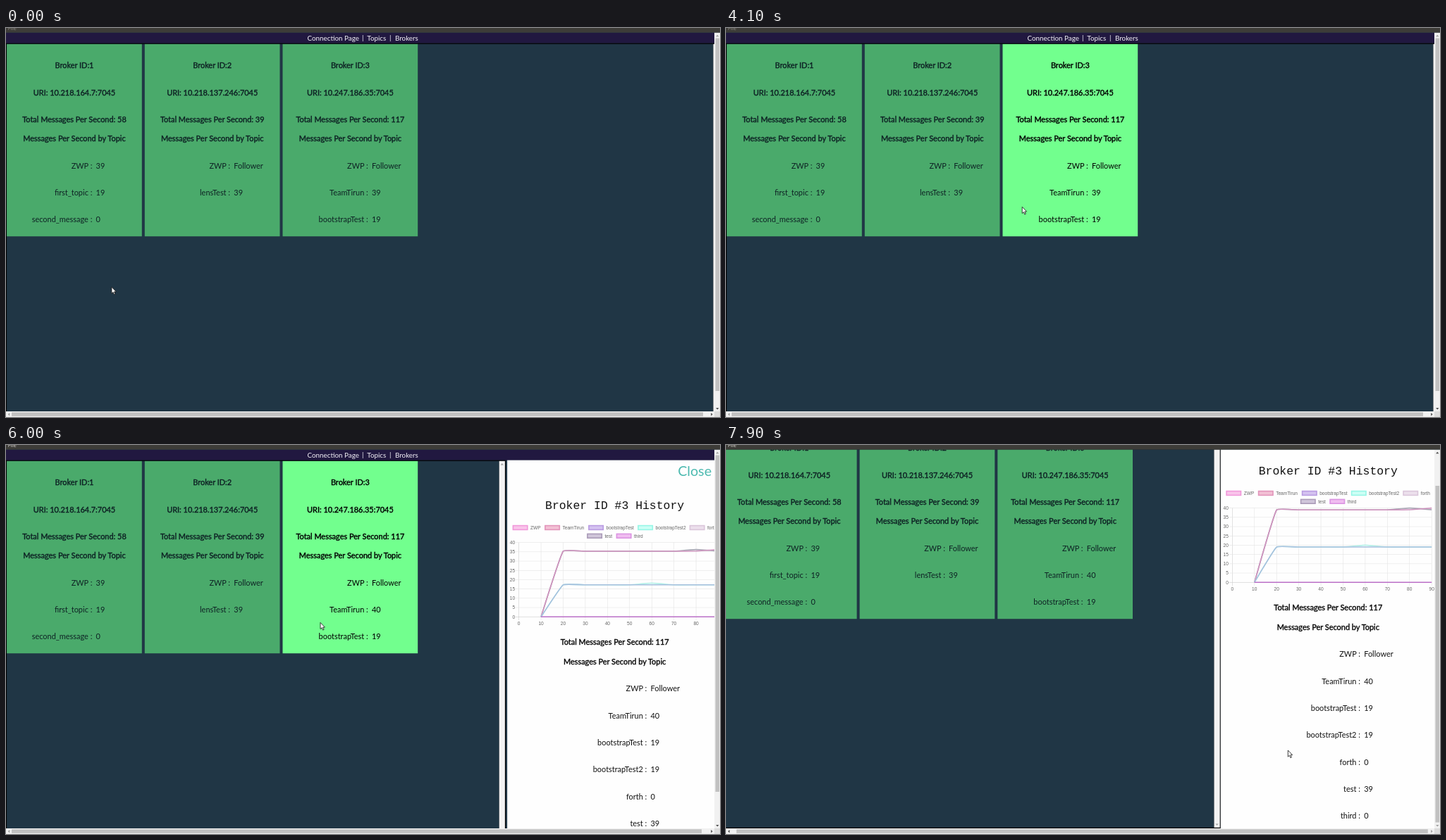
An HTML page that plays this animation: 1013 by 553 pixels, repeating every 8000 ms.

```html
<!DOCTYPE html>
<html lang="en">
<head>
<meta charset="utf-8">
<title>Broker dashboard</title>
<style>
html, body { margin: 0; width: 100%; height: 100%; overflow: hidden; background: #203645; }
svg { display: block; width: 100vw; height: 100vh; }
text { font-family: Lato, sans-serif; font-size: 10.95px; }
.bold { stroke-width: .4px; }
.nav { font-size: 9.86px; fill: #f4f2f8; }
.close { font-size: 19.7px; fill: #4dbab0; }
.title { font-family: "Liberation Mono", monospace; font-size: 16.43px; fill: #111; }
.tick { font-family: "Liberation Sans", sans-serif; font-size: 6.57px; fill: #666; }
.file { font-family: "Open Sans", sans-serif; font-size: 7.6px; }
.card rect { fill: #4aaa6b; }
.card text { fill: #0e2224; }
.card .bold { stroke: #0e2224; }
.card.on rect { fill: #72ff8e; }
.card.on text { fill: #000; }
.card.on .bold { stroke: #000; }
.panel .bold { stroke: #111; }
.panel .stat { fill: #111; }
</style>
</head>
<body>
<svg id="stage" viewBox="0 0 1013 553" preserveAspectRatio="none"></svg>
<script>
const LOOP = 8000, STEP = 100;
const OPEN = 5500, SLIDE = 5555, PANEL_W = 305, PAGE_W = 1012.8;
const SCROLL_X = 7.2, SCROLL_Y = 49;
const VIEW_R = 1005, VIEW_B = 545;
const ROW = 38.33;

const rect = (x, y, w, h, fill, extra = '') =>
  `<rect x="${x}" y="${y}" width="${w}" height="${h}" fill="${fill}" ${extra}/>`;
const text = (x, y, str, cls = '', anchor = 'middle', extra = '') =>
  `<text x="${x}" y="${y}" class="${cls}" text-anchor="${anchor}" ${extra}>${str}</text>`;
const row = (x, y, [name, value], id = '') =>
  text(x, y, name + ' :', 'stat', 'end') +
  text(x + 5.2, y, value, 'stat', 'start', id && `id="${id}"`);
const arrow = (x, y, angle, id = '') =>
  `<path d="M-2.2 1.2L0 -1.2L2.2 1.2Z" fill="#505050" transform="translate(${x} ${y}) rotate(${angle})" ${id && `id="${id}"`}/>`;

const brokers = [
  { uri: '10.218.164.7:7045', total: 58, rows: [['ZWP', 39], ['first_topic', 19], ['second_message', 0]] },
  { uri: '10.218.137.246:7045', total: 39, rows: [['ZWP', 'Follower'], ['lensTest', 39]] },
  { uri: '10.247.186.35:7045', total: 117, rows: [['ZWP', 'Follower'], ['TeamTirun', 39], ['bootstrapTest', 19]] }
];

function card(b, i) {
  const x = 1.1 + i * 195.7, mid = x + 95.9;
  const head = (y, s) => text(mid, y, s, 'bold');
  return `<g class="card">${rect(x, 22.9, 191.7, 273.3, '')}` +
    head(57.2, 'Broker ID:' + (i + 1)) +
    head(95.5, 'URI: ' + b.uri) +
    head(133.8, 'Total Messages Per Second: ' + b.total) +
    head(161.2, 'Messages Per Second by Topic') +
    b.rows.map((r, k) => row(x + 121.3, 199.6 + k * ROW, r, i === 2 && k === 1 ? 'count' : '')).join('') +
    '</g>';
}

// Chart geometry, in page coordinates
const X0 = 725.5, DX = 31.43, Y0 = 244.2, DY = 13.2;
const legend = [
  [716.5, 117.5, 'ZWP', '#f9c4ea', '#f198da'],
  [762, 117.5, 'TeamTirun', '#f2c0d4', '#e294ba'],
  [824, 117.5, 'bootstrapTest', '#d4c2f0', '#b99be2'],
  [894, 117.5, 'bootstrapTest2', '#ccfff5', '#96f6e6'],
  [967.5, 117.5, 'forth', '#ecdfec', '#dac6da'],
  [822, 129.3, 'test', '#d0c6da', '#aa9bb8'],
  [863.5, 129.3, 'third', '#f0bdf0', '#db94e2']
];
const flat = (v, bumps = {}) =>
  Array.from({ length: 9 }, (_, i) => i === 0 ? 0 : bumps[i] ?? v);
const series = [
  [flat(39, { 7: 40, 8: 39.1 }), '#a9a6b4'],
  [flat(39, { 7: 39.1, 8: 40 }), '#cf92be'],
  [flat(19, { 5: 20 }), '#b4f0e8'],
  [flat(19), '#a6c0de'],
  [flat(0), '#bb70c8']
];

// Smooth curve through the points with a light spline tension
function curve(values, grow) {
  const p = values.map((v, i) => [X0 + (i + 1) * DX, Y0 - v * grow * DY / 5]);
  const dist = (a, b) => Math.hypot(b[0] - a[0], b[1] - a[1]);
  const ctrl = p.map((c, i) => {
    const a = p[i - 1] || c, b = p[i + 1] || c;
    const d1 = dist(a, c), d2 = dist(c, b), k = .1 / (d1 + d2);
    const at = f => [c[0] + f * (b[0] - a[0]), Math.min(Y0, c[1] + f * (b[1] - a[1]))];
    return [at(-k * d1), at(k * d2)];
  });
  return 'M' + p[0] + p.slice(1).map((c, i) => `C${ctrl[i][1]} ${ctrl[i + 1][0]} ${c}`).join('');
}

function chart() {
  let s = '';
  for (let i = 0; i < 10; i++) {
    const x = X0 + i * DX;
    s += rect(x - .25, Y0 - 8 * DY, .55, 8 * DY + 5, i ? '#e2e2e2' : '#c8c8c8') +
      text(x, 256.2, i * 10, 'tick');
  }
  for (let i = 0; i < 9; i++) {
    const y = Y0 - i * DY;
    s += rect(X0 - 5, y - .25, 9 * DX + 5, .55, i ? '#e2e2e2' : '#c8c8c8') +
      text(X0 - 5.5, y + 2.3, i * 5, 'tick', 'end');
  }
  for (const [x, y, name, fill, edge] of legend)
    s += rect(x + .8, y - 2.9, 20.4, 5.8, fill, `stroke="${edge}" stroke-width="1.6"`) +
      text(x + 25.4, y + 2.4, name, 'tick', 'start');
  return s + series.map(([, c]) =>
    `<path class="line" fill="none" stroke="${c}" stroke-width="1.6" stroke-linejoin="round"/>`).join('');
}

const history = [['ZWP', 'Follower'], ['TeamTirun', 40], ['bootstrapTest', 19],
  ['bootstrapTest2', 19], ['forth', 0], ['test', 39], ['third', 0]];

const panel = `<g class="panel" id="panel">${rect(709, 21.6, PANEL_W, 580, '#fefefe')}` +
  text(975, 43.6, 'Close', 'close') +
  text(861.5, 90.6, 'Broker ID #3 History', 'title') + chart() +
  text(861.5, 284.4, 'Total Messages Per Second: 117', 'bold') +
  text(861.5, 311.8, 'Messages Per Second by Topic', 'bold') +
  history.map((r, i) => row(907.2, 350.2 + i * ROW, r)).join('') + '</g>';

// Bordered list area with its own idle scrollbar on the right
const list = (id, right) => `<g id="${id}">` +
  rect(0, 21.6, right, 572.6, '#000') +
  rect(1.1, 22.8, right - 10.4, 570, '#203645') +
  rect(right - 9.3, 22.8, 8.2, 570, '#f3f3f3') +
  `<g opacity=".5">${arrow(right - 5.2, 27.3, 0)}${arrow(right - 5.2, 588.6, 180)}</g></g>`;

const stage = document.getElementById('stage');
stage.innerHTML =
  `<clipPath id="view">${rect(0, 6.5, VIEW_R, VIEW_B - 6.5, '#000')}</clipPath>` +
  rect(0, 0, 1013, 553, '#203645') +
  `<g clip-path="url(#view)"><g id="page">` +
    rect(0, 6.5, 1020, 15.1, '#211840') +
    text(464.2, 17.7, 'Connection Page', 'nav') + text(506.2, 17.2, '|', 'nav') +
    text(525.8, 17.7, 'Topics', 'nav') + text(545.3, 17.2, '|', 'nav') +
    text(568.4, 17.7, 'Brokers', 'nav') +
    list('wide', PAGE_W) + list('split', 709) +
    brokers.map(card).join('') + panel +
  `</g></g>` +
  rect(0, VIEW_B, 1013, 8, '#f1f1f1') + rect(VIEW_R, 6.5, 8, VIEW_B - 6.5, '#f1f1f1') +
  rect(VIEW_R, VIEW_B, 8, 8, '#dcdcdc') +
  rect(8, 546.3, 981, 5.6, '#c1c1c1', 'id="hthumb"') +
  rect(1006.5, 14.5, 5.6, 501.5, '#c1c1c1', 'id="vthumb"') +
  arrow(4, 549.2, -90, 'left') + arrow(1001.4, 549.2, 90, 'right') +
  arrow(1009.3, 11, 0, 'up') + arrow(1009.3, 541.2, 180, 'down') +
  rect(0, 0, 1013, 6.5, '#3d3c38') + text(2.8, 3, 'File', 'file', 'start', 'id="file"') +
  `<path id="cursor" d="M0 0V9.2L2.1 7.3L3.6 10.7L5.1 10L3.6 6.7H6.4Z" fill="#fff" stroke="#111" stroke-width=".8"/>`;

const $ = id => document.getElementById(id);
const cards = [...stage.querySelectorAll('.card')];
const lines = [...stage.querySelectorAll('.line')];
const set = (el, attrs) => { for (const k in attrs) el.setAttribute(k, attrs[k]); };

// Pointer path: time, x, y
const path = [
  [0, 149.9, 368.2], [500, 149.9, 368.2], [600, 148.4, 364.3], [2100, 148.4, 364.3],
  [2200, 146.2, 318], [2300, 143, 272], [2400, 141, 249], [2500, 140, 243],
  [3000, 140, 243], [3100, 149, 243], [3300, 192.6, 243.2], [3500, 258, 250],
  [3700, 296, 254], [3800, 296, 254], [4100, 420.2, 254.3], [4200, 438, 253.5],
  [4400, 445.4, 253], [5000, 445.4, 253], [5100, 446, 252.4], [6300, 446, 252.4],
  [6400, 449, 262], [6500, 456, 280], [6600, 467.2, 301.3], [6700, 524.5, 390],
  [6800, 524.5, 390], [6900, 600, 430], [7000, 715, 448], [7100, 785, 431.5],
  [7200, 785, 431.5], [7300, 797.3, 434]
];
const hover = [[2300, 3300], [3300, 4100], [4100, 6700]];

const clamp = v => Math.max(0, Math.min(1, v));

function pointer(t) {
  const i = path.findIndex(k => k[0] > t);
  if (i < 0) return path[path.length - 1].slice(1);
  const [a, b] = [path[i - 1], path[i]], f = (t - a[0]) / (b[0] - a[0]);
  return [a[1] + f * (b[1] - a[1]), a[2] + f * (b[2] - a[2])];
}

// cubic-bezier(.25, .1, .25, 1)
function ease(x) {
  const bez = (u, p, q) => 3 * u * (1 - u) ** 2 * p + 3 * u * u * (1 - u) * q + u ** 3;
  let lo = 0, hi = 1;
  for (let i = 0; i < 24; i++) {
    const m = (lo + hi) / 2;
    if (bez(m, .25, .25) < x) lo = m; else hi = m;
  }
  return bez(hi, .1, 1);
}

function draw(t) {
  const open = t >= OPEN;
  const off = open ? PANEL_W * (1 - ease(clamp((t - SLIDE) / 500))) : 0;
  const grow = 1 - (1 - clamp((t - SLIDE) / 1000)) ** 4;
  const s = clamp((t - 7500) / 400), scroll = s * s * (3 - 2 * s);

  set($('page'), { transform: `translate(${-SCROLL_X * scroll} ${-SCROLL_Y * scroll})` });
  set($('wide'), { display: open ? 'none' : 'inline' });
  set($('split'), { display: open ? 'inline' : 'none' });
  set($('panel'), { display: open ? 'inline' : 'none', transform: `translate(${off} 0)` });
  lines.forEach((l, i) => set(l, { d: curve(series[i][0], grow) }));
  cards.forEach((c, i) => c.classList.toggle('on', t >= hover[i][0] && t < hover[i][1]));
  $('count').textContent = open ? 40 : 39;

  set($('hthumb'), { x: 8 + 6.8 * scroll, width: 981 * PAGE_W / (PAGE_W + off) });
  set($('vthumb'), { y: 14.5 + 43.5 * scroll, height: open ? 478.5 : 501.5 });
  for (const id of ['left', 'up']) set($(id), { opacity: scroll > 0 ? 1 : .5 });
  for (const id of ['right', 'down']) set($(id), { opacity: scroll < 1 ? 1 : .5 });
  set($('file'), { fill: open ? '#dddbd5' : '#8c8a84' });
  set($('cursor'), { transform: `translate(${pointer(t)})` });
}

const start = performance.now();
function tick() {
  const t = (performance.now() - start) % LOOP;
  draw(Math.floor(t / STEP) * STEP);
  requestAnimationFrame(tick);
}
tick();
</script>
</body>
</html>
```
